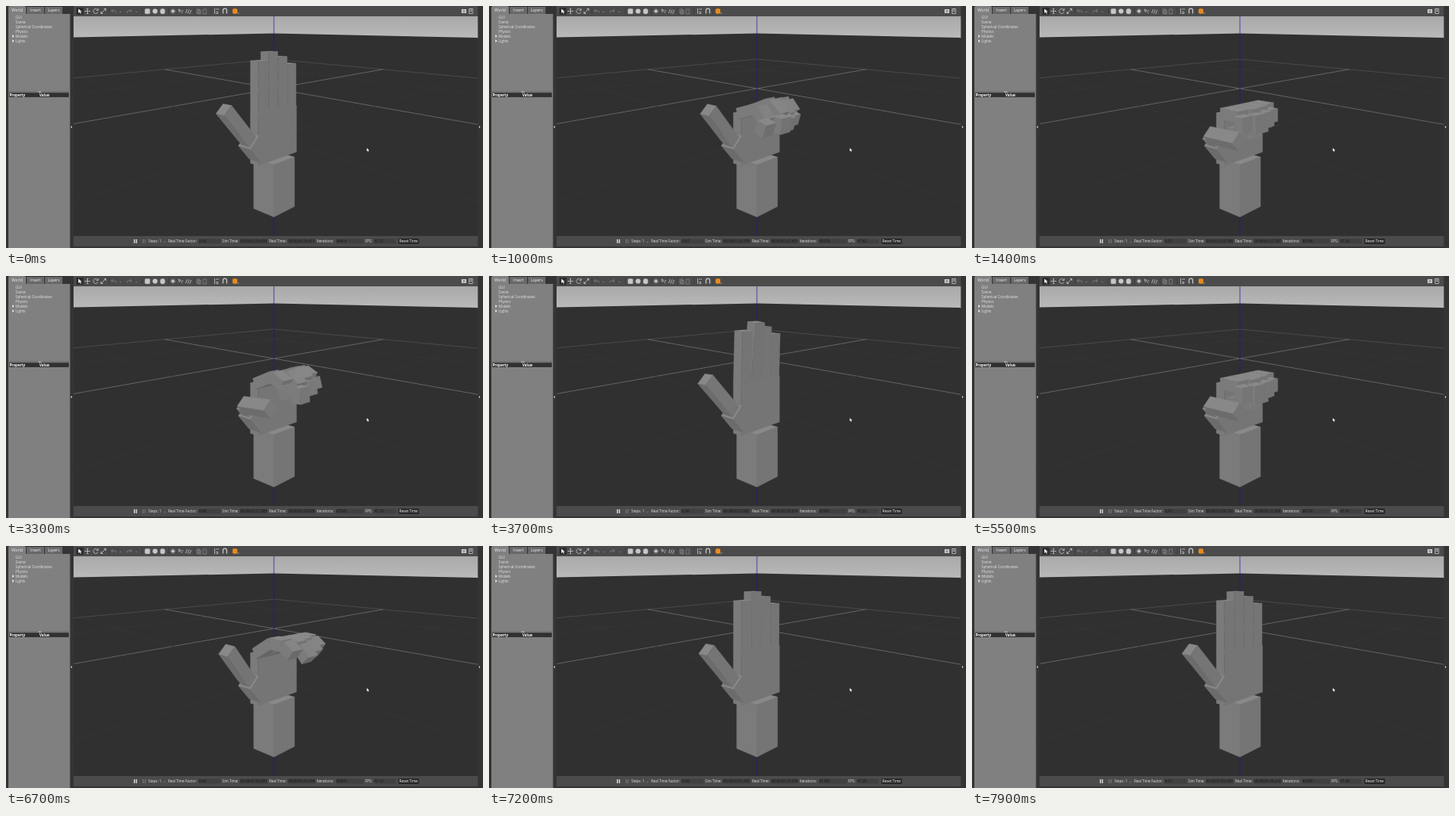
Write an HTML page that moves like this. It is 600 px wide and 305 px high and loops after 8 s.

```html
<!DOCTYPE html>
<html lang="en">
<head>
<meta charset="utf-8">
<title>Robot hand simulation</title>
<style>
html, body { margin: 0; width: 100%; height: 100%; overflow: hidden; background: #303030; }
svg { display: block; width: 600px; height: 305px; font: 4.5px "Open Sans", "Noto Sans", sans-serif; }
</style>
</head>
<body>
<svg id="stage" viewBox="0 0 600 305">
  <defs>
    <linearGradient id="sky" x1="0" y1="0" x2="0" y2="1">
      <stop offset="0" stop-color="#a9a9a9"/><stop offset="1" stop-color="#bababa"/>
    </linearGradient>
    <clipPath id="view"><rect x="85" y="13" width="508.5" height="276.5"/></clipPath>
  </defs>
  <rect width="600" height="305" fill="#343434"/>
  <g clip-path="url(#view)">
    <rect x="85" y="13" width="509" height="28" fill="url(#sky)"/>
    <path d="M85 39.5L337 34.5L594 40V290H85Z" fill="#303030"/>
    <g id="grid" fill="none"></g>
    <path d="M337 13V35" stroke="#4444a8"/>
    <path d="M337 35V290" stroke="#20207c"/>
    <g id="hand" stroke-width=".35" stroke-linejoin="round"></g>
    <path d="M453.8 179v4l1-.8.7 1.5.8-.4-.7-1.4h1.3Z" fill="#fff"/>
  </g>
  <g id="panel">
    <rect x="3" y="10" width="77.5" height="295" fill="#808080"/>
    <rect x="3" width="22" height="12" rx="2" fill="#808080"/>
    <path d="M26 10V1H48V10ZM49 10V1H71V10Z" fill="#686868"/>
    <path d="M8 36.3l2.3 1.8L8 39.9ZM8 42.3l2.3 1.8L8 45.9Z" fill="#f0f0f0"/>
    <rect x="3" y="107" width="77.5" height="2" fill="#747474"/>
    <path d="M40.5 108.3h4" stroke="#eee" stroke-width=".8"/>
    <rect x="4" y="109.3" width="75" height="5.6" fill="#303030"/>
    <path d="M83 151l-1.6 1.5 1.6 1.5ZM595 151l1.6 1.5-1.6 1.5Z" fill="#e8e8e8"/>
  </g>
  <g id="tools" fill="none" stroke="#c4c4c4" stroke-width=".8">
    <rect x="85" width="508.5" height="13" fill="#4b4b4b" stroke="none"/>
    <rect x="88.5" y="2" width="9" height="9" fill="#2c2c2c" stroke="none"/>
    <path d="M91 3.5v5.5l1.5-1.2 1.4 2 .9-.6-1.3-1.9h2Z" fill="#eee" stroke="none"/>
    <path d="M102.5 3v7M99 6.5h7M101.500 4l1-1 1 1M101.500 9l1 1 1-1"/>
    <path d="M115.5 5a3 3 0 1 0 .2 2.5M116 3v2.5h-2.5"/>
    <path d="M119.5 9.5l6-6M119.5 7v2.5h2.5M123 3.5h2.5v2.5"/>
    <path d="M134.5 4l-2 2 2 2M132.5 6h4q2 0 2 2.5M156 4l2 2-2 2M158 6h-4q-2 0-2 2.5" stroke="#858585"/>
    <path d="M143 7l1 1 1-1M163 7l1 1 1-1" stroke="#858585"/>
    <rect x="175" y="3.8" width="5.8" height="5.8" rx=".8" fill="#c8c8c8"/>
    <circle cx="187.5" cy="6.5" r="3.1" fill="#c8c8c8" stroke="none"/>
    <rect x="194.3" y="3.7" width="5.4" height="6" rx="2" fill="#c8c8c8"/>
    <circle cx="210" cy="6.5" r="1.5" fill="#ddd"/>
    <path d="M210 3v7M206.5 6.5h7M207.5 4l5 5M212.5 4l-5 5" stroke-width=".5"/>
    <path d="M217 4l3 1.5-2 2ZM220 7l2 2M221 5.5l2 .8"/>
    <path d="M226 9l2-5M228.5 9.5l2-5M231 10l2-5"/>
    <path d="M240 4h3.5v5H240ZM241.5 5.5H245v4.5h-3.5ZM248 4h4v6h-4Z" stroke="#858585"/>
    <path d="M262.5 3v7M264 4h4M264 7.5h2.5v2H264"/>
    <path d="M273 9.5V5.5a2.3 2.3 0 0 1 4.6 0v4" stroke-width="1.3"/>
    <path d="M285 4l3-1 3 1v5l-3 1-3-1Z" fill="#e68a1d" stroke="none"/>
    <path d="M291 8.5l1 1 1-1"/>
    <rect x="573" y="4" width="6" height="5" rx=".6" fill="#d0d0d0" stroke="none"/>
    <circle cx="576" cy="6.6" r="1.2" stroke="#444" stroke-width=".6"/>
    <path d="M582.5 3.5h4.5v6h-4.5ZM583.5 5h2.5M583.5 6.5h2.5"/>
  </g>
  <g id="status">
    <rect x="85" y="290" width="508.5" height="13" fill="#4b4b4b"/>
    <path d="M161.5 294v5M164 294v5" stroke="#e6e6e6" stroke-width="1.3"/>
    <path d="M172.5 294v5M175 294v5" stroke="#8c8c8c" stroke-width=".8"/>
    <path d="M198.5 297l.9.9.9-.9" fill="none" stroke="#bbb" stroke-width=".5"/>
    <rect x="493.5" y="293" width="26" height="7" rx="1" fill="#282828"/>
  </g>
</svg>
<script>
const LOOP = 8000, SVG = "http://www.w3.org/2000/svg";
const byId = id => document.getElementById(id);

function add(parent, tag, attrs, text) {
  const el = document.createElementNS(SVG, tag);
  for (const key in attrs) el.setAttribute(key, attrs[key]);
  if (text) el.textContent = text;
  return byId(parent).appendChild(el);
}
const label = (parent, x, y, text, fill = "#e4e4e4", extra = {}) =>
  add(parent, "text", { x, y, fill, ...extra }, text);

// Toolbar separators
for (const x of [129.5, 171.5, 204.5, 237, 258, 282])
  add("tools", "path", { d: `M${x} 2v9`, stroke: "#3a3a3a" });

// Side panel and status bar text
["World", "Insert", "Layers"].forEach((s, i) =>
  label("panel", 14 + i * 23, 6.8, s, "#f0f0f0", { "text-anchor": "middle", "font-size": 5 }));
["GUI", "Scene", "Spherical Coordinates", "Physics", "Models", "Lights"].forEach((s, i) =>
  label("panel", 12, 15.7 + i * 6, s));
label("panel", 4.5, 113.7, "Property", "#fff", { "font-weight": 700 });
label("panel", 42, 113.7, "Value", "#fff", { "font-weight": 700 });

label("status", 179, 298, "Steps:  1");
label("status", 494.8, 298, "Reset Time", "#fff");

function field(x, name, fieldX, width) {
  label("status", x, 298, name);
  add("status", "rect", { x: fieldX, y: 293.5, width, height: 6, fill: "#404040" });
  return label("status", fieldX + .8, 298, "", "#151515");
}
const factor = field(204, "Real Time Factor:", 242, 28);
const simTime = field(272, "Sim Time:", 294, 35);
const realTime = field(331, "Real Time:", 354.5, 35);
const iterations = field(391, "Iterations:", 415, 35);
const fps = field(452, "FPS:", 462.5, 28);

// Ground grid in perspective
const HORIZON = 25;
function ground(u, v) {
  const h = 1 / Math.max(.0238 - .005575 * (u + v), .0028);
  return [337 + 2.5 * (v - u) * h, HORIZON + h];
}
for (let k = 0; k < 3.5; k += .5) {
  const end = 3.7 - k, main = k === 1;
  const stroke = main ? "#707070" : k === 0 ? "#5c5c5c" : "#383838";
  for (const flip of [false, true]) {
    const at = m => flip ? ground(m, k) : ground(k, m);
    add("grid", "path", { d: `M${at(0)}L${at(end)}`, stroke, "stroke-width": main ? .8 : .6 });
  }
}

// Hand space: [across the palm, out of the palm, up]
const DIST = 520, EYE = [-385, 348, 241], ACROSS = [1, 0, 0], OUT = [0, 1, 0], UP = [0, 0, 1];
const mix = (a, s, b, t) => a.map((x, i) => x * s + b[i] * t);
const plus = (a, b, t = 1) => mix(a, 1, b, t);
const dot = (a, b) => a.reduce((sum, x, i) => sum + x * b[i], 0);
const depth = ([w, n]) => DIST + .74 * w - .67 * n;

function project(p) {
  const s = DIST / depth(p);
  return [337 + (.67 * p[0] + .74 * p[1]) * s, HORIZON + (EYE[2] - p[2]) * s]
    .map(x => x.toFixed(2)).join();
}

// Visible faces of a box given its centre, unit axes and half sizes
function box(centre, axes, half) {
  let out = "";
  for (let i = 0; i < 3; i++) {
    const j = (i + 1) % 3, k = (i + 2) % 3;
    for (const side of [-1, 1]) {
      const normal = axes[i].map(x => x * side);
      const mid = plus(centre, normal, half[i]);
      if (dot(normal, plus(EYE, mid, -1)) <= 0) continue;
      const points = [[-1, -1], [1, -1], [1, 1], [-1, 1]].map(([a, b]) =>
        project(plus(plus(mid, axes[j], a * half[j]), axes[k], b * half[k])));
      const g = Math.round(117 + 20 * normal[2] + 6 * Math.abs(normal[0]));
      const colour = `rgb(${g},${g},${g})`;
      out += `<polygon points="${points.join(" ")}" fill="${colour}" stroke="${colour}"/>`;
    }
  }
  return out;
}

// A link of given length from a start point, bent from "dir" towards the palm side
function link(start, dir, side, degrees, length, wide, thick) {
  const a = degrees * Math.PI / 180;
  const along = mix(dir, Math.cos(a), OUT, Math.sin(a));
  const face = mix(OUT, Math.cos(a), dir, -Math.sin(a));
  const centre = plus(start, along, length / 2);
  return {
    end: plus(start, along, length),
    far: depth(centre),
    draw: () => box(centre, [side, along, face], [wide, length / 2, thick])
  };
}

// Steps: time since start, three finger joint angles, thumb angle
const CLOSE = [
  [0, 0, 0, 0, 0], [80, 9, 9, 10, -3], [180, 49, 40, 35, 0], [280, 71, 65, 60, 3],
  [480, 86, 85, 76, 48], [680, 90, 90, 80, 88], [880, 90, 90, 80, 90]
];
const OPEN = [
  [0, 90, 90, 80, 90], [80, 84, 76, 70, 87], [180, 68, 50, 50, 82], [280, 62, 35, 35, 6],
  [480, 18, 7, 7, -3], [580, 2, 0, 0, -3], [830, 0, 0, 0, 0]
];
const MOVES = [[720, CLOSE], [3120, OPEN], [4720, CLOSE], [6420, OPEN]];

function pose(t) {
  const [start, steps] = MOVES.filter(m => m[0] <= t).pop() || [t, CLOSE];
  const i = steps.findIndex(s => s[0] > t - start);
  if (i < 0) return steps[steps.length - 1].slice(1);
  const a = steps[i - 1], b = steps[i], k = (t - start - a[0]) / (b[0] - a[0]);
  return mix(a, 1 - k, b, k).slice(1);
}

const FINGERS = [[66.5, -15], [77, 15], [69.5, 0], [59, -10]]; // length, lag
const SHARES = [.46, .29, .25];
const THUMB = [-.67, 0, .74], THUMB_SIDE = [.74, 0, .67];

function finger(i, t) {
  const [length, lag] = FINGERS[i], joints = pose(t - lag), links = [];
  let start = [-7 + 19 * i, -19, 130], bend = 0;
  SHARES.forEach((share, j) => {
    bend += joints[j];
    const part = link(start, UP, ACROSS, bend, length * share, 9, 7);
    links.push(part);
    start = part.end;
  });
  return links.sort((a, b) => b.far - a.far).map(l => l.draw()).join("");
}

function hand(t) {
  const axes = [ACROSS, OUT, UP];
  let out = box([20.5, -18, 33], axes, [20.5, 18, 33]) + box([22, -19, 98], axes, [38, 7, 32]);
  for (let i = 3; i >= 0; i--) out += finger(i, t);
  const base = link([-7, -19, 77], THUMB, THUMB_SIDE, 0, 28, 10, 11);
  const neck = link(base.end, THUMB, THUMB_SIDE, 0, 12, 7.5, 7.5);
  const tip = link(neck.end, THUMB, THUMB_SIDE, pose(t)[3], 49, 7.5, 7.5);
  return out + base.draw() + neck.draw() + tip.draw();
}

const clock = s => "00:00:0" + Math.floor(s / 60) + ":" + (s % 60).toFixed(3).padStart(6, "0");

function readouts(t) {
  const sim = 84.414 + t * .000964, wave = Math.sin(t / 610);
  factor.textContent = wave > .3 ? "0.97" : "0.96";
  simTime.textContent = clock(sim);
  realTime.textContent = clock(86.411 + t * .00099);
  iterations.textContent = Math.round(sim * 1000);
  fps.textContent = (47.37 + .25 * wave).toFixed(2);
}

let shown = -1;
function frame(now) {
  const t = Math.floor(now % LOOP / 100) * 100;
  if (t !== shown) {
    shown = t;
    byId("hand").innerHTML = hand(t);
    const moving = t >= 800 && t <= 1600 || t >= 3200 && t <= 5600 || t >= 6400;
    readouts(moving ? t : Math.floor(t / 200) * 200);
  }
  requestAnimationFrame(frame);
}
frame(performance.now());
</script>
</body>
</html>
```
